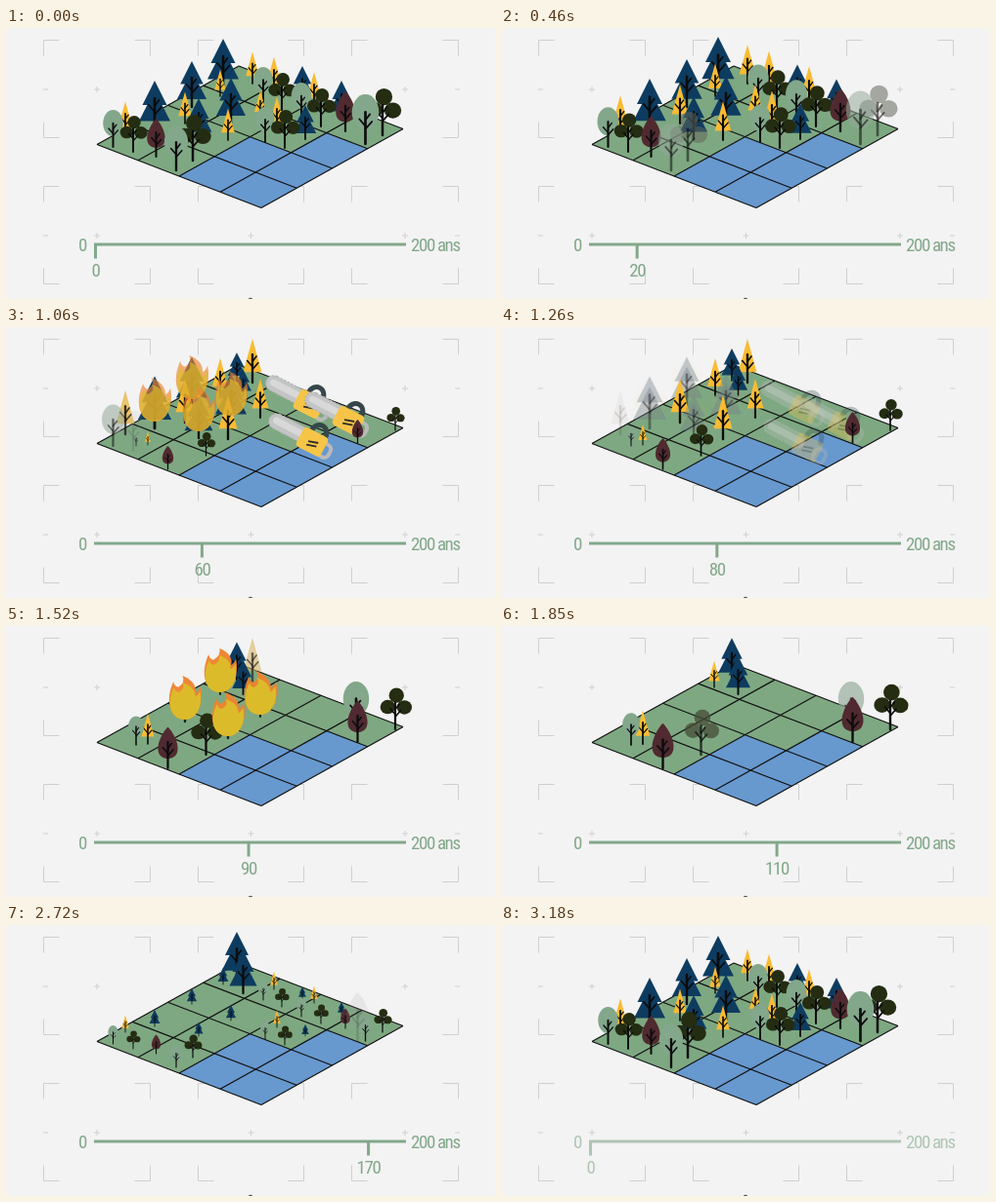
Write an HTML page with a canvas that moves like this. It is 500 by 278 pixels and loops after 3240 ms.

```html
<!DOCTYPE html>
<html lang="fr">
<head>
<meta charset="utf-8">
<title>Cycle forestier</title>
<style>
html, body { margin: 0; width: 100%; height: 100%; overflow: hidden; background: #f3f3f3; }
canvas, svg { position: absolute; left: 0; top: 0; width: 500px; height: 278px; }
text {
  font: 400 19px "Roboto Condensed", "Open Sans Condensed", "Liberation Sans Narrow", Roboto, "Open Sans", sans-serif;
  font-stretch: ultra-condensed;
  letter-spacing: -1.4px;
  fill: #82a88a;
}
path { fill: none; stroke: #82a88a; stroke-width: 3; }
</style>
</head>
<body>
<canvas id="scene"></canvas>
<svg viewBox="0 0 500 278">
  <g id="scale">
    <path d="M90 222H409"/>
    <text x="74" y="229">0</text>
    <text x="414" y="229">200 ans</text>
    <g id="marker">
      <path d="M0 221V236.500"/>
      <text id="years" x="0" y="254.500" text-anchor="middle">0</text>
    </g>
  </g>
</svg>
<script>
const LOOP = 3240, STEPS = 49;
const $ = id => document.getElementById(id);
const canvas = $('scene'), ctx = canvas.getContext('2d');
const dpr = window.devicePixelRatio || 1;
canvas.width = 500 * dpr;
canvas.height = 278 * dpr;

const clamp = (v, lo = 0, hi = 1) => Math.min(hi, Math.max(lo, v));
const ramp = (t, a, b) => clamp((t - a) / (b - a));

// Linear interpolation over flat [time, value, ...] keys
function sample(keys, t) {
  if (t <= keys[0]) return keys[1];
  for (let i = 2; i < keys.length; i += 2) {
    if (t <= keys[i]) {
      return keys[i - 1] + (keys[i + 1] - keys[i - 1]) * ramp(t, keys[i - 2], keys[i]);
    }
  }
  return keys[keys.length - 1];
}

function poly(points, fill) {
  ctx.beginPath();
  points.forEach(([x, y]) => ctx.lineTo(x, y));
  ctx.closePath();
  if (fill) ctx.fillStyle = fill;
  ctx.fill();
}

function ellipse(x, y, rx, ry) {
  ctx.beginPath();
  ctx.ellipse(x, y, rx, ry, 0, 0, Math.PI * 2);
  ctx.fill();
}

function box(x, y, w, h, r) {
  ctx.beginPath();
  ctx.roundRect(x, y, w, h, r);
}

function lines(segments) {
  ctx.beginPath();
  for (const [x1, y1, x2, y2] of segments) {
    ctx.moveTo(x1, y1);
    ctx.lineTo(x2, y2);
  }
  ctx.stroke();
}

// Ground
const LEFT = [93, 119.5], TOP = [238, 39], RIGHT = [406, 103.5], BOTTOM = [261, 184.5];
function tile(i, j) {
  const u = i / 4, v = j / 4;
  return [0, 1].map(k =>
    (1 - v) * ((1 - u) * LEFT[k] + u * BOTTOM[k]) + v * ((1 - u) * TOP[k] + u * RIGHT[k]));
}

function drawGround() {
  poly([LEFT, TOP, RIGHT, BOTTOM], '#7ea881');
  poly([tile(2, 0), tile(2, 2), tile(3, 2), tile(3, 3), tile(4, 3), tile(4, 0)], '#6798ce');
  ctx.strokeStyle = '#111';
  ctx.lineWidth = 1.2;
  for (let i = 0; i <= 4; i++) {
    lines([[...tile(i, 0), ...tile(i, 4)], [...tile(0, i), ...tile(4, i)]]);
  }
}

function drawCropMarks() {
  ctx.strokeStyle = '#cfcfcf';
  ctx.lineWidth = 1;
  for (const [l, r] of [[38.5, 147.5], [196.5, 304.5], [353.5, 462.5]]) {
    for (const [t, b] of [[12.5, 112.5], [162.5, 262.5]]) {
      for (const [x, sx] of [[l, 1], [r, -1]]) {
        for (const [y, sy] of [[t, 1], [b, -1]]) {
          lines([[x, y, x + 16 * sx, y], [x, y, x, y + 16 * sy]]);
        }
      }
      const cx = (l + r) / 2, cy = (t + b) / 2 + .5;
      lines([[cx - 3, cy, cx + 3, cy], [cx, cy - 3, cx, cy + 3]]);
    }
  }
  for (const y of [63, 213]) lines([[38, y, 43, y], [459, y, 464, y]]);
  ctx.fillStyle = '#555';
  ellipse(250, 278, 2, 1.2);
}

// Trees, drawn one unit tall with the foot at the origin
const COLORS = {
  fir: [14, 60, 96], larch: [249, 187, 51], birch: [130, 167, 139],
  oak: [36, 44, 18], beech: [80, 42, 48]
};
const BRANCHES = [[0, -.3, .13, -.45], [0, -.36, -.12, -.5], [0, -.48, .09, -.6]];
const CROWNS = {
  fir() {
    poly([[0, -1], [.25, -.5], [-.25, -.5]]);
    poly([[0, -.8], [.32, -.17], [-.32, -.17]]);
  },
  larch() { poly([[0, -1], [.21, -.24], [-.21, -.24]]); },
  birch() { ellipse(0, -.64, .27, .36); },
  oak() {
    ellipse(.03, -.82, .18, .18);
    ellipse(-.18, -.54, .18, .17);
    ellipse(.22, -.53, .18, .17);
  },
  beech() {
    ctx.beginPath();
    ctx.moveTo(0, -1);
    ctx.bezierCurveTo(.22, -.78, .4, -.26, 0, -.23);
    ctx.bezierCurveTo(-.4, -.26, -.22, -.78, 0, -1);
    ctx.fill();
  }
};

function drawTree(kind, x, y, h, dying) {
  if (h < 1 || dying >= 1) return;
  const rgb = COLORS[kind].map(c => Math.round(c + (170 - c) * dying));
  ctx.save();
  ctx.translate(x, y);
  ctx.scale(h, h);
  ctx.globalAlpha = 1 - dying;
  ctx.fillStyle = `rgb(${rgb})`;
  CROWNS[kind]();
  ctx.strokeStyle = '#0c0c0c';
  ctx.lineCap = 'round';
  ctx.lineWidth = .052;
  lines([[0, 0, 0, -.64]]);
  ctx.lineWidth = .036;
  lines(BRANCHES);
  ctx.restore();
}

// Growth curves; times past LOOP run on into the next round
const GROW = {
  young: [2100, 0, 2182, .33, 2711, .5, 2905, 1, LOOP, 1, 4030, 1.12],
  fir: [2450, 0, 2711, .34, 2905, 1, LOOP, 1, 4030, 1.07],
  gold: [2100, 0, 2182, .24, 2711, .39, 2905, .77, LOOP, .77, 4030, 1],
  late: [2711, 0, 2905, .72, LOOP, .72, 4030, 1],
  second: [600, 0, 793, .3, 1058, .48, 1520, .85, 2182, 1],
  edge: [950, 0, 1058, .36, 1520, .82, 2182, 1],
  third: [1400, 0, 2182, 1],
  quick: [1100, 0, 1500, 1],
  giant: [560, 0, 793, .35, 1058, .6, 1520, .8, 2182, .98, 2711, 1]
};

// kind, x, foot, height, growth, death, flame start
const TREES = [
  ['fir', 222, 61, 50, 'fir', 500],
  ['fir', 190, 81, 47, 'fir', 1080, 740],
  ['fir', 152, 104, 50, 'fir', 1080, 740],
  ['fir', 230, 98, 47, 'fir', 1080, 740],
  ['fir', 197, 114, 42, 'fir', 1080, 740],
  ['fir', 303, 76, 37, 'fir', 560],
  ['fir', 306, 114, 35, 'fir', 560],
  ['fir', 343, 92, 38, 'fir', 560],
  ['larch', 252, 57, 45, 'late', 1400],
  ['larch', 219, 70, 38, 'late', 1480, 1300],
  ['larch', 183, 98, 45, 'late', 1480, 1300],
  ['larch', 227, 115, 45, 'late', 1480, 1300],
  ['larch', 260, 93, 40, 'late', 1480, 1300],
  ['larch', 122, 110, 45, 'gold', 1000],
  ['larch', 274, 66, 47, 'gold', 560],
  ['larch', 315, 80, 45, 'gold', 560],
  ['larch', 277, 105, 45, 'gold', 560],
  ['birch', 109.5, 122, 38, 'young', 930],
  ['birch', 263, 77, 37, 'young', 580],
  ['birch', 302, 94, 38, 'young', 580],
  ['birch', 265, 117, 36, 'young', 580],
  ['birch', 367.5, 119, 51, 'young', 330],
  ['birch', 174, 146, 45, 'young', 330],
  ['oak', 130, 127, 37, 'young', 800],
  ['oak', 282, 84, 38, 'young', 580],
  ['oak', 322, 101, 39, 'young', 580],
  ['oak', 285, 123, 39, 'young', 580],
  ['oak', 385, 110, 48, 'young', 330],
  ['oak', 191, 136, 47, 'young', 330],
  ['beech', 153.5, 132, 39, 'young', 710],
  ['beech', 347, 106, 41, 'young', 710],
  ['beech', 165.5, 146, 50, 'second', 2300],
  ['beech', 359.5, 119, 50, 'second', 2460],
  ['oak', 204.5, 132, 50, 'second', 1780],
  ['oak', 398, 106, 50, 'second', 1960],
  ['birch', 133, 122, 36, 'edge', 2300],
  ['larch', 145, 121, 38, 'edge', 2300],
  ['birch', 358, 106, 49, 'quick', 1750],
  ['larch', 218, 63, 47, 'third', 2350],
  ['fir', 236, 55, 48, 'giant', 2978],
  ['fir', 242.5, 70, 44, 'giant', 2978]
].map(([kind, x, y, size, grow, death, fire]) => ({ kind, x, y, size, grow, death, fire }))
  .sort((a, b) => a.y - b.y);

function flamePath(w, h, sway) {
  ctx.beginPath();
  ctx.moveTo(0, 0);
  ctx.bezierCurveTo(w * .8, 0, w * 1.15, -h * .4, w * .95, -h * .76);
  ctx.quadraticCurveTo(w * .8, -h * .63, w * .65, -h * .62);
  ctx.quadraticCurveTo(w * .7 + sway, -h * .87, -w * .15 + sway, -h);
  ctx.quadraticCurveTo(w * .05, -h * .84, -w * .4, -h * .74);
  ctx.quadraticCurveTo(-w * .6, -h * .74, -w * .7, -h * .86);
  ctx.bezierCurveTo(-w * 1.2, -h * .45, -w * .95, 0, 0, 0);
}

function drawFlame(x, y, start, t) {
  const alpha = ramp(t, start, start + 220) * (1 - ramp(t, start + 210, start + 520));
  if (!alpha) return;
  const sway = Math.sin(t / 45 + x) * 2;
  ctx.save();
  ctx.globalAlpha = alpha;
  ctx.translate(x, y);
  ctx.fillStyle = '#ee8430';
  flamePath(17, 45, sway);
  ctx.fill();
  ctx.fillStyle = '#dcbd2a';
  flamePath(16, 38, sway * .6);
  ctx.fill();
  ctx.restore();
}

function drawSaw(x, y, alpha) {
  ctx.save();
  ctx.globalAlpha = alpha;
  ctx.translate(x, y);
  ctx.rotate(.48);
  ctx.fillStyle = '#c3c4c4';
  box(-50, -10, 46, 16, 8);
  ctx.fill();
  ctx.strokeStyle = '#b2b3b3';
  ctx.lineWidth = 1.3;
  ctx.setLineDash([2, 2]);
  ctx.stroke();
  ctx.setLineDash([]);
  ctx.fillStyle = '#d8d8d8';
  box(-46, -6, 40, 7, 3.5);
  ctx.fill();
  ctx.strokeStyle = '#b9bab8';
  ctx.lineWidth = 4;
  box(9, -5, 12, 14, 5);
  ctx.stroke();
  ctx.strokeStyle = '#35474a';
  ctx.lineWidth = 5;
  ctx.beginPath();
  ctx.moveTo(-6, -9);
  ctx.bezierCurveTo(-7, -23, 11, -24, 10, -8);
  ctx.stroke();
  ctx.fillStyle = '#f6c547';
  box(-14, -11, 28, 22, 4);
  ctx.fill();
  ctx.strokeStyle = '#2d2d2d';
  ctx.lineWidth = 1.8;
  lines([[-4, 1, 6, -2], [-4, 5, 6, 2]]);
  ctx.restore();
}

function drawSaws(t) {
  const alpha = ramp(t, 640, 790) * (1 - ramp(t, 1070, 1340));
  if (!alpha) return;
  const dy = sample([640, -33, 793, -21, 1058, 0, 1340, 8], t);
  for (const [x, y] of [[310, 79], [350, 96], [313, 118]]) drawSaw(x, y + dy, alpha);
}

function drawScale(step, t) {
  const rewound = t > 2978;
  const value = rewound ? 0 : Math.min(200, 4.3 * step);
  const years = Math.max(0, Math.floor((value - 1.7) / 10) * 10);
  $('marker').setAttribute('transform', `translate(${91.5 + value * 1.583} 0)`);
  $('years').textContent = years;
  $('scale').setAttribute('opacity', rewound ? ramp(t, 2976, 3306) : 1 - ramp(t, 2711, 2909));
}

function render(now) {
  const step = Math.floor((now % LOOP) * STEPS / LOOP + .05) % STEPS;
  const t = step * LOOP / STEPS;
  ctx.setTransform(dpr, 0, 0, dpr, 0, 0);
  ctx.clearRect(0, 0, 500, 278);
  drawCropMarks();
  drawGround();
  drawSaws(t);
  for (const tree of TREES) {
    const keys = GROW[tree.grow];
    const wraps = keys[keys.length - 2] > LOOP;
    const u = wraps && t < 1900 ? t + LOOP : t;
    const death = tree.death + (wraps ? LOOP : 0);
    const dying = ramp(u, death, death + (tree.grow === 'giant' ? 190 : 290));
    drawTree(tree.kind, tree.x, tree.y, tree.size * sample(keys, u), dying);
  }
  for (const { kind, x, y, fire } of TREES) {
    if (fire) drawFlame(x, y - (kind === 'fir' ? 7 : 2), fire, t);
  }
  drawScale(step, t);
}

const begin = performance.now();
function tick() {
  render(performance.now() - begin);
  requestAnimationFrame(tick);
}
tick();
</script>
</body>
</html>
```
